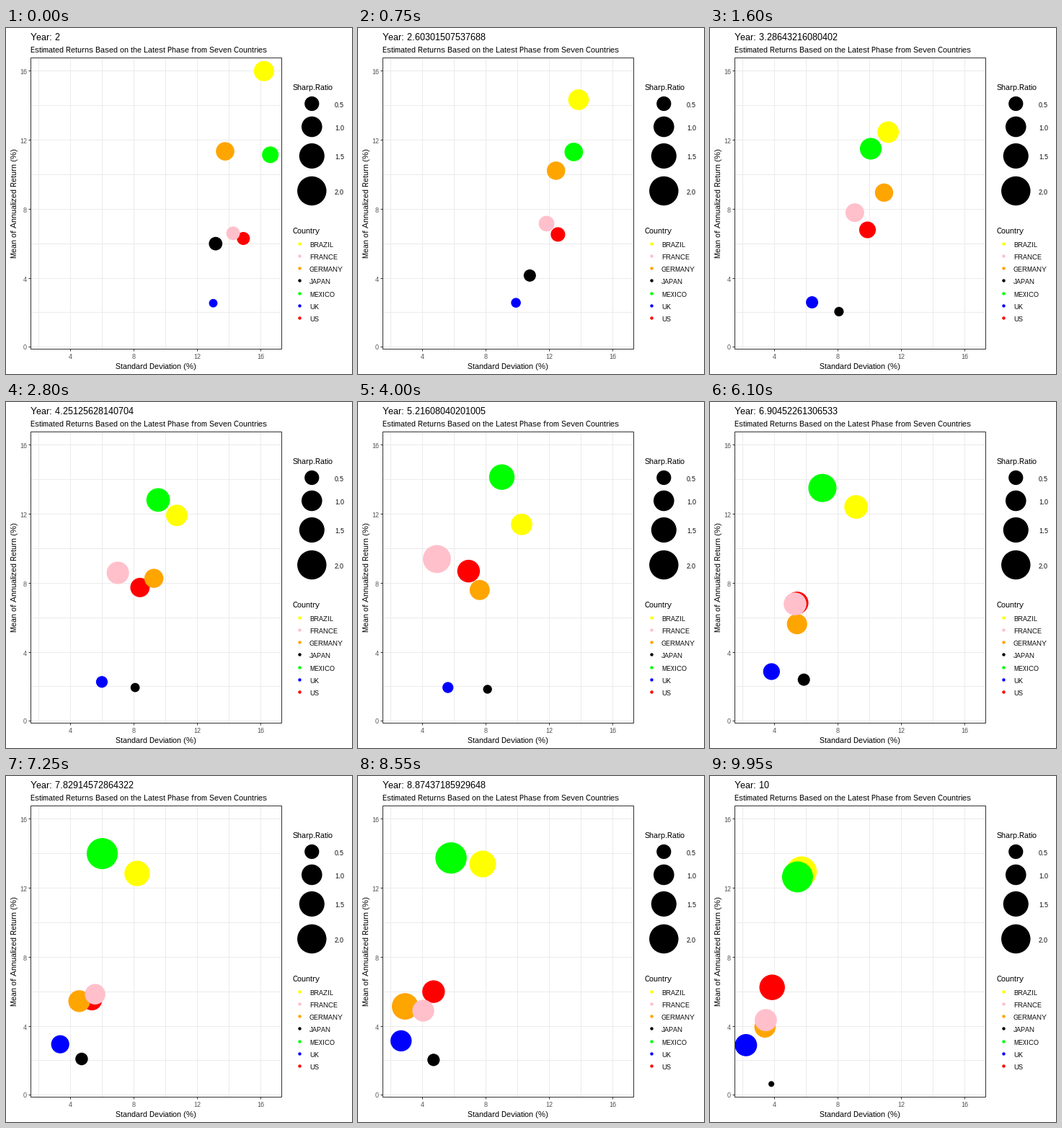
These frames come from a looping animation (480 px wide and 480 px high, 10 s). A matplotlib script:

```python
import numpy as np
import matplotlib.pyplot as plt
from matplotlib.animation import FuncAnimation
from matplotlib.patches import Circle, Rectangle

plt.rcParams.update({
    "font.family": "Liberation Sans",
    "text.hinting": "native",
    "text.hinting_factor": 1,
})

FRAMES, INTERVAL = 200, 50
PX = 0.75  # points per pixel at 96 dpi
LEFT, TOP, RIGHT, BOTTOM = 34.5, 41.5, 382.5, 445.5
GRID, DARK, TICK = "#ebebeb", "#333333", "#4d4d4d"
RISK_FREE = 0.35

# Back to front: colour, then (deviation, return) at each key year
YEARS = [2, 3.29, 5.22, 6.02, 7.83, 8.87, 10]
COUNTRIES = {
    "US": ("red", (14.9, 6.3), (9.85, 6.8), (6.9, 8.7), (5.5, 8.15),
           (5.35, 5.5), (4.7, 6), (3.85, 6.25)),
    "BRAZIL": ("yellow", (16.2, 16), (11.15, 12.45), (10.25, 11.4),
               (10.05, 12), (8.2, 12.85), (7.8, 13.4), (5.7, 12.95)),
    "GERMANY": ("orange", (13.75, 11.35), (10.9, 8.95), (7.6, 7.6),
                (6.25, 5.8), (4.55, 5.45), (2.9, 5.15), (3.4, 3.95)),
    "FRANCE": ("pink", (14.25, 6.6), (9.05, 7.8), (4.9, 9.4), (5.05, 7.7),
               (5.55, 5.85), (4.05, 4.9), (3.45, 4.35)),
    "MEXICO": ("lime", (16.6, 11.15), (10.05, 11.5), (9, 14.15), (8, 13.05),
               (6, 14), (5.8, 13.75), (5.45, 12.65)),
    "JAPAN": ("black", (13.15, 6), (8.05, 2.05), (8.1, 1.85), (6.95, 2.7),
              (4.7, 2.1), (4.7, 2.05), (3.8, 0.65)),
    "UK": ("blue", (13, 2.55), (6.35, 2.6), (5.6, 1.95), (4.25, 2.8),
           (3.35, 2.95), (2.65, 3.15), (2.2, 2.9)),
}

fig = plt.figure(figsize=(5, 5), dpi=96, facecolor="white")
ax = fig.add_axes([0, 0, 1, 1])
ax.set_xlim(0, 480)
ax.set_ylim(480, 0)
ax.axis("off")


def to_x(deviation):
    return 1.5 + 22 * deviation


def to_y(mean):
    return 442.8 - 23.94 * mean


def radius(ratio):
    return 14.3 * np.sqrt(ratio)


def label(x, y, text, size, color="black", **kw):
    return ax.text(x, y, text, fontsize=size * PX, color=color, **kw)


def line(x0, y0, x1, y1, color, z):
    ax.plot([x0, x1], [y0, y1], color=color, lw=PX, zorder=z, snap=False,
            solid_capstyle="butt")


def disc(x, y, r, color, z=3):
    return ax.add_patch(Circle((x, y), r, fc=color, ec="none", zorder=z))


# Panel: grid, ticks, border
for v in range(0, 18, 2):
    x, y = to_x(v), np.floor(to_y(v)) + 0.5
    line(LEFT, y, RIGHT, y, GRID, 1)
    if v:
        line(x, TOP, x, BOTTOM, GRID, 1)
    if v % 4 == 0:
        line(LEFT - 3, y, LEFT, y, DARK, 5)
        label(29, y + 4, str(v), 9, TICK, ha="right")
        if v:
            line(x, BOTTOM, x, BOTTOM + 3, DARK, 5)
            label(x, 459, str(v), 9, TICK, ha="center")
ax.add_patch(Rectangle((LEFT, TOP), RIGHT - LEFT, BOTTOM - TOP, fill=False,
                       ec=DARK, lw=PX, snap=False, zorder=5))

title = label(34, 17, "", 13)
label(34, 34, "Estimated Returns Based on the Latest Phase from Seven Countries", 11)
label(208, 473, "Standard Deviation (%)", 11, ha="center")
label(12, 243, "Mean of Annualized Return (%)", 11,
      rotation=90, ha="center", va="center")

# Legends
label(398, 86, "Sharp.Ratio", 11)
for ratio, y in zip([0.5, 1.0, 1.5, 2.0], [105, 137, 177.5, 226]):
    disc(424.3, y, radius(ratio), "black")
    label(456, np.floor(y) + 5, f"{ratio:.1f}", 9)

label(398, 285, "Country", 11)
for i, name in enumerate(sorted(COUNTRIES)):
    y = np.floor(299.3 + 17.2 * i)
    disc(407.5, y + 0.5, 2.2, COUNTRIES[name][0])
    label(421, y + 5, name, 9)

bubbles = [(disc(0, 0, 1, color, 3 + 0.1 * i), *zip(*path))
           for i, (color, *path) in enumerate(COUNTRIES.values())]


def update(i):
    year = 2 + 8 * i / (FRAMES - 1)
    title.set_text(f"Year: {year:.15g}")
    for patch, deviations, means in bubbles:
        deviation = np.interp(year, YEARS, deviations)
        mean = np.interp(year, YEARS, means)
        patch.set_center((to_x(deviation), to_y(mean)))
        patch.set_radius(radius((mean - RISK_FREE) / deviation))
    return [title] + [b[0] for b in bubbles]


anim = FuncAnimation(fig, update, frames=FRAMES, interval=INTERVAL,
                     repeat=True, repeat_delay=0)
plt.show()
```
